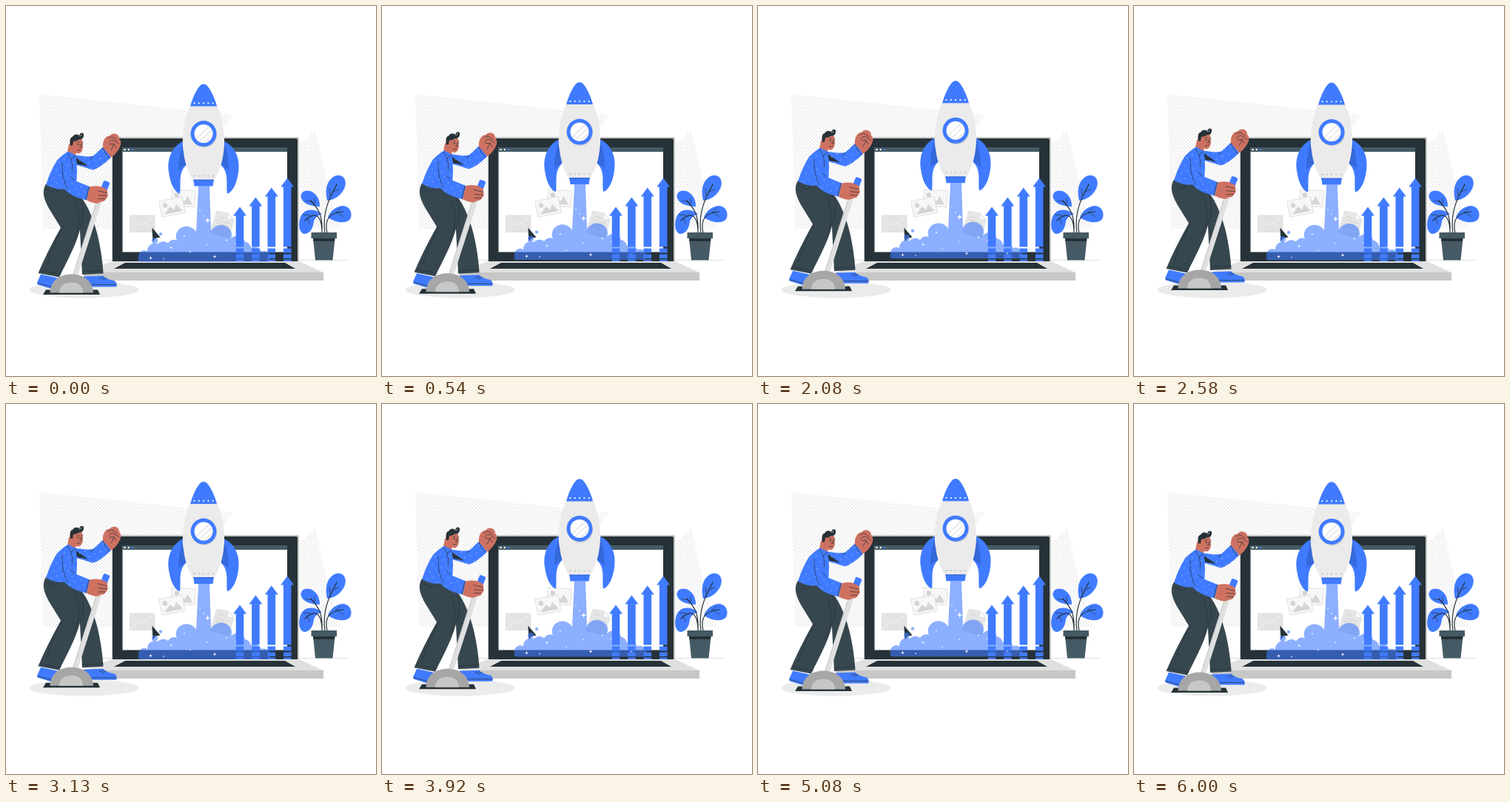
Animation, 500 px wide and 500 px high, one loop 6.04 s. Source, as an HTML page:

```html
<!DOCTYPE html>
<html lang="en">
<head>
<meta charset="utf-8">
<title>Rocket launch</title>
<style>
html, body { margin: 0; width: 100%; height: 100%; overflow: hidden; background: #fff; }
svg { display: block; width: 100vw; height: 100vh; }
.blue { fill: #407bff; }
.dark { fill: #263238; }
.slate { fill: #37474f; }
.skin { fill: #ce7161; }
.line { fill: none; stroke: #263238; stroke-width: .7; stroke-linecap: round; stroke-linejoin: round; }
</style>
</head>
<body>
<svg viewBox="0 0 500 500">
  <defs>
    <pattern id="halftone" width="4.500" height="4.500" patternUnits="userSpaceOnUse">
      <g fill="#c9c9c9"><circle cx="1.100" cy="1.100" r=".7"/><circle cx="3.350" cy="3.350" r=".7"/></g>
    </pattern>
    <pattern id="specks" width="13" height="11" patternUnits="userSpaceOnUse" patternTransform="rotate(18)">
      <g fill="#fff" opacity=".8"><circle cx="3" cy="2" r=".6"/><circle cx="9" cy="7.500" r=".6"/></g>
    </pattern>
    <clipPath id="glass"><circle cx="267" cy="172" r="12.500"/></clipPath>
  </defs>

  <g fill="url(#halftone)">
    <path d="M45 119L308 147L282 178L145 301H50Z"/>
    <path d="M418 168L432 230L453 301H397V186Z"/>
  </g>
  <path d="M110 343.500H461" stroke="#bdbdbd" stroke-width=".5"/>
  <ellipse cx="105.500" cy="383.500" rx="74" ry="11" fill="#ebebeb"/>

  <g id="laptop">
    <path d="M145 177H394Q396 177 396 179V346H143V179Z" fill="#c7c7c7"/>
    <path class="dark" d="M146 179H392Q394 179 394 181V345H144V181Q144 179 146 179Z"/>
    <path d="M157.500 191H380V332.500H157.500Z" fill="#fff"/>
    <path d="M157.500 191H380V197H157.500Z" fill="#455a64"/>
    <circle cx="160.500" cy="194" r="1.300" fill="#fff"/>
    <circle cx="165.800" cy="194" r="1.300" fill="#fff"/>
    <circle class="blue" cx="171" cy="194" r="1.300"/>
    <path d="M143 345H396L429 360H105Z" fill="#e0e0e0"/>
    <path d="M105 360H429V371H105Z" fill="#c7c7c7"/>
    <path class="dark" d="M161 347H377L391 355H146Z"/>
  </g>

  <g id="files" fill="#ebebeb" stroke="#dcdcdc" stroke-width=".8">
    <path d="M167.500 283H201V305.500H167.500Z" fill="#e3e3e3"/>
    <path d="M168 284L184 296L200.500 284M168 305L179 293M200 305L189 293" fill="none" stroke="#f5f5f5"/>
    <g id="photo">
      <path d="M-16-11H16V11H-16Z" fill="#f7f7f7"/>
      <g fill="#d4d4d4" stroke="none"><circle cx="-9" cy="-4" r="3.300"/><path d="M-12 8L-3-1L2 4L6-3L13 8Z"/></g>
    </g>
    <path d="M285 277L300 280L308 289L301 313L276 306Z" fill="#e6e6e6"/>
    <path d="M300 280L299 288L308 289Z" fill="#fafafa"/>
    <path d="M287 284L296 287M285 289L302 294M284 293L300 298M283 297L299 302" stroke="#cfcfcf"/>
  </g>
  <path class="dark" d="M197.300 299.500L198.500 318.500L202.300 313.800L208.500 312.500Z"/>

  <g id="smoke">
    <path class="blue" opacity=".6" d="M260 243H275L277 304A14 13 0 0 1 304 314A11 11 0 0 1 323 318A11 11 0 0 1 331 326A10 10 0 0 1 345 331A9 9 0 0 1 357 341Q357 345 353 345H183Q177 345 179 339A8 8 0 0 1 191 331A10 10 0 0 1 205 321A10 10 0 0 1 219 320A9 9 0 0 1 231 316A14 13 0 0 1 257 305Z"/>
    <circle class="blue" cx="201" cy="316.500" r="4" opacity=".6"/>
    <circle class="blue" cx="209" cy="307.500" r="2.200" opacity=".6"/>
    <g id="sparks" fill="#fff"></g>
  </g>
  <g id="bars" class="blue"></g>

  <g id="rocket">
    <g id="fins"></g>
    <path class="blue" d="M253 233H281L279.500 243H254.500Z"/>
    <path d="M253.200 234H280.800L280.600 235.500H253.400Z" fill="#3568da"/>
    <path d="M249 134H285C294 153 297 181 294 197C292 215 286 227 282 234H252C248 227 242 215 240 197C237 181 240 153 249 134Z" fill="#ebebeb"/>
    <path class="blue" d="M249 135C253 120 260 108 264 105.700Q267 104 270 105.700C274 108 281 120 285 135Z"/>
    <g id="rivets"></g>
    <circle cx="268" cy="174" r="17" fill="#d2d2d2"/>
    <circle class="blue" cx="267" cy="172" r="17.500"/>
    <circle cx="267" cy="172" r="12.500" fill="#fff"/>
    <path clip-path="url(#glass)" d="M256 180L275 162M260 184L279 166M266 186L281 172" stroke="#e6e6e6" stroke-width="1.500"/>
  </g>

  <g id="plant">
    <g class="blue">
      <path d="M434 263C431 250 432 236 445 229.500C456 226 462 236 457 247C452 257 443 262 434 263Z"/>
      <path d="M424 271C410 271 400 266 398.500 258C398 250 407 247 415 252C422 257 424 264 424 271Z"/>
      <path d="M435 286C437 278 446 270 456 270C465 271 469 281 465 288C459 295 447 293 435 286Z"/>
      <path d="M427 281C417 273 403 273 398 285C394 297 397 308 404 308C412 307 415 299 416 291C418 285 422 283 427 281Z"/>
    </g>
    <path class="line" style="stroke-width:1.200" d="M427 307C428 285 424 276 412 263M431 307C427 278 437 260 447 241M434 307C430 288 437 279 456 278M427 307C427 283 418 276 404 290"/>
    <path class="line" d="M438 256L437 247M441 251L450 248M417 268L417 260M414 265L405 263M446 279L452 273M448 279L456 285M411 283L402 282M407 286L410 294"/>
    <path d="M412.500 306H447V314H412.500Z" fill="#455a64"/>
    <path d="M415 314H444.500L441.500 343.500H418Z" fill="#455a64"/>
    <path class="dark" d="M415 314H444.500L444 318H415.500Z"/>
  </g>

  <g id="man">
    <path class="blue" d="M47 362L70 367L66 383L43 376Q41 374 43 371Z"/>
    <path class="blue" d="M105 365L131 364Q136 369 147 371Q151 375 149 379H102Z"/>
    <path class="line" d="M43 374L66 380M104 376H149M126 368L132 366M130 370L135 367"/>
    <path class="slate" d="M80 247L100 256C112 270 120 294 124 310Q130 336 131.500 361L103 362.500L100 304Z"/>
    <path class="slate" d="M54 240C48 250 51 260 58 273L74 299Q55 333 43.500 360.500L72 366C84 341 102 310 102 286Q102 268 98 256L92 245Z"/>
    <path class="line" d="M99 257Q110 275 100 300M94 263Q105 291 91 317M103 358.500L131 357M46 357L74 362M77 298Q63 323 55 349M53 246L66 252L71 248"/>

    <path class="blue" d="M94 201Q111 204 118 202L132 189L142 204Q127 219 117 221Q105 217 94 214Z"/>
    <path d="M94 204L111 216L96 213Z" class="dark"/>
    <path class="skin" d="M85 186L96 190L94 203Q89 202 83 197Z"/>
    <path class="blue" d="M84 196L94 201Q98 219 94 247L71 247Q63 246 54 241Q60 222 69 208Q77 200 84 196Z"/>
    <path class="blue" d="M76 202Q86 204 89 216L92 235L114 244L109 262Q88 257 80 248Q73 233 72 215Z"/>
    <path fill="url(#specks)" d="M84 196L118 202L132 189L142 204Q127 219 117 221L97 214L93 235L114 244L109 262Q88 257 80 248L54 241Q60 217 69 208Z"/>
    <path class="line" d="M83 198L88 206L94 202M88 206Q91 215 89 223M76 211Q75 233 83 246M92 235L87 230M112 244L108 261M118 203L114 206M131 191Q134 200 140 205"/>

    <path class="skin" d="M88 180Q96 176 103 180L104 190Q103 198 98 199Q91 197 88 191Q84 190 86 186Z"/>
    <path class="dark" d="M87 188Q85 177 90 176Q93 171 99 174Q101 169 105 172Q106 180 98 180Q94 183 91 182L90 188Z"/>
    <path class="line" d="M96 184L99 183M102 184L104 184M100 186L102 190L99 190M96 194Q99 196 101 193"/>
    <circle class="dark" cx="97.500" cy="186.500" r=".9"/><circle class="dark" cx="102.600" cy="186.500" r=".8"/>
    <path class="line" d="M98 174Q102 177 102 173" style="stroke:#fff;stroke-width:.5"/>

    <path class="skin" d="M131 191C130 182 134 175 140 175Q143 171 147 172Q153 173 153 179Q157 183 154 190Q149 200 142 204Q138 198 131 191Z"/>
    <path class="line" d="M138 179Q141 175 145 177L150 181M139 184Q143 178 147 182L153 186M140 186L146 186L149 191M146 186L142 194"/>

    <path d="M131 247L93 365" stroke="#e0e0e0" stroke-width="7"/>
    <path d="M128 247L90 365" stroke="#c7c7c7" stroke-width="1"/>
    <path class="blue" d="M131.500 237Q132 235 134 235.500L139 237.500Q140.500 238 140 240L135 252L127 249Z"/>
    <path class="skin" d="M113 244Q124 241 132 245Q138 247 137 252Q139 257 135 260Q134 264 128 264Q123 269 109 262Z"/>
    <path class="line" d="M124 249L136 252M125 255L136 256M125 260L134 260"/>
    <path class="dark" d="M54 383H124L127 389.500H50Z"/>
    <path d="M59.500 387C60 371 72 362 88.500 362S117 371 118 387Z" fill="#a6a6a6"/>
    <path d="M72 387C72 378 79 373 88.500 373S104 378 104 387Z" fill="#c7c7c7"/>
  </g>
</svg>
<script>
const LOOP = 6040;
const AMPLITUDE = 7;
const REST = 0.6;
const byId = id => document.getElementById(id);

function add(parent, tag, attrs) {
  const node = document.createElementNS('http://www.w3.org/2000/svg', tag);
  for (const key in attrs) node.setAttribute(key, attrs[key]);
  return parent.appendChild(node);
}

const photo = byId('photo');
const backPhoto = photo.cloneNode(true);
backPhoto.removeAttribute('id');
photo.before(backPhoto);
backPhoto.setAttribute('transform', 'translate(239.5 260) rotate(3)');
photo.setAttribute('transform', 'translate(224.5 271.5) rotate(-11)');

[1, -1].forEach(side => {
  const fin = add(byId('fins'), 'g', { transform: side < 0 ? 'translate(534 0) scale(-1 1)' : '' });
  add(fin, 'path', { class: 'blue', d: 'M240 182C225 188 217 205 220 224C222 241 229 252 235 253C237 241 232 226 243 215Z' });
  add(fin, 'path', { fill: '#3568da', d: 'M240 183Q233 199 233 222Q236 218 244 214Z' });
});

for (let i = -2; i <= 2; i++) {
  const x = 267 + i * 6.3;
  add(byId('rivets'), 'circle', { cx: x, cy: 130.7, r: 1.1, fill: '#fff' });
  add(byId('rivets'), 'circle', { cx: x, cy: 229, r: 1.1, fill: '#c2c2c2' });
}

// Four-pointed stars: x, y, radius
[[272.5, 289, 4], [241, 310, 1.8], [223, 326, 2.4], [195.5, 340, 2.6], [282, 338, 2.6], [298, 316, 2], [337, 338, 1.8]]
  .forEach(([x, y, r]) => {
    const q = r * .22;
    add(byId('sparks'), 'path', {
      d: `M0 ${-r}L${q} ${-q}L${r} 0L${q} ${q}L0 ${r}L${-q} ${q}L${-r} 0L${-q} ${-q}Z`,
      transform: `translate(${x} ${y})`
    });
  });
[[262, 276], [267, 283], [249, 332], [213, 341], [310, 321], [272, 322]].forEach(([cx, cy]) =>
  add(byId('sparks'), 'circle', { cx, cy, r: .8 }));

for (let i = 0; i < 4; i++) {
  const x = 316 + i * 21.4, top = 271.5 - i * 13;
  const blocks = [[top + 11, 325.5], [327.5, 333.5], [335.5, 341], [342.5, 345]];
  add(byId('bars'), 'path', {
    d: `M${x} ${top}L${x + 9} ${top + 12}H${x - 9}Z` +
      blocks.map(([a, b]) => `M${x - 5.3} ${a}H${x + 5.3}V${b}H${x - 5.3}Z`).join('')
  });
}

// Linear rise and fall, 0 to 1 to 0
const bounce = (t, period) => 1 - Math.abs(2 * (t % period) / period - 1);

function float(id, t, period) {
  byId(id).setAttribute('transform', `translate(0 ${REST - AMPLITUDE * bounce(t, period)})`);
}

function draw(t) {
  float('rocket', t, LOOP / 2);
  float('smoke', t, LOOP / 2);
  float('man', t, LOOP);
}

const start = performance.now();
function tick() {
  draw((performance.now() - start) % LOOP);
  requestAnimationFrame(tick);
}
tick();
</script>
</body>
</html>
```
